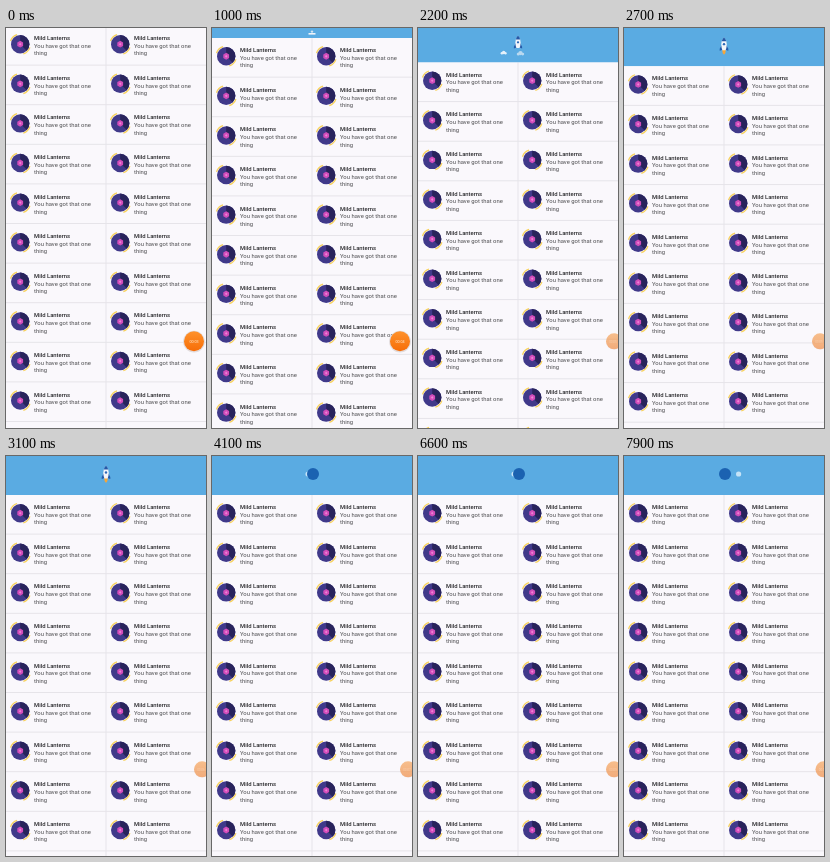
Animation, 200 px wide and 400 px high, one loop 8000 ms. Source, as an HTML page with a canvas:

```html
<!DOCTYPE html>
<html lang="en">
<head>
<meta charset="utf-8">
<title>Pull to refresh</title>
<style>
html, body { margin: 0; width: 100%; height: 100%; overflow: hidden; background: #faf8fc; }
canvas { display: block; width: 200px; height: 400px; }
</style>
</head>
<body>
<canvas></canvas>
<script>
const LOOP = 8000, ROW = 39.6, REFRESH_START = 3950;
const canvas = document.querySelector('canvas');
const ctx = canvas.getContext('2d');
const ratio = window.devicePixelRatio || 1;
canvas.width = 200 * ratio;
canvas.height = 400 * ratio;
ctx.scale(ratio, ratio);

// [time, value] stops
const pullStops = [[0, -2], [500, 3], [1000, 10], [1400, 21.5], [1800, 29], [2200, 34.5], [2800, 39]];
const bubbleStops = [[1850, 188], [2150, 196], [6900, 196], [7200, 199.5]];
const dimStops = [[1850, 0], [2150, 1]];

function along(stops, t) {
  if (t <= stops[0][0]) return stops[0][1];
  for (let i = 1; i < stops.length; i++) {
    const [t0, a] = stops[i - 1], [t1, b] = stops[i];
    if (t < t1) return a + (b - a) * (t - t0) / (t1 - t0);
  }
  return stops[stops.length - 1][1];
}

function circle(x, y, r, color) {
  ctx.fillStyle = color;
  ctx.beginPath();
  ctx.arc(x, y, r, 0, 2 * Math.PI);
  ctx.fill();
}

function shape(path, color) {
  ctx.fillStyle = color;
  ctx.fill(new Path2D(path));
}

function text(str, x, y, font, color) {
  ctx.font = font;
  ctx.fillStyle = color;
  ctx.fillText(str, x, y);
}

function badge(x, y) {
  ctx.save();
  ctx.translate(x, y);
  ctx.strokeStyle = '#f8d25c';
  ctx.lineWidth = 1.3;
  for (const a of [.1, 1.1]) {
    ctx.beginPath();
    ctx.arc(0, 0, 10.2, a * Math.PI, (a + .3) * Math.PI);
    ctx.stroke();
  }
  circle(0, 0, 9.2, '#40398a');
  ctx.fillStyle = '#28235b';
  ctx.beginPath();
  ctx.arc(0, 0, 9.2, -Math.PI / 2, Math.PI / 4);
  ctx.lineTo(0, 0);
  ctx.fill();
  shape('M0-3.4L2.9-1.7V1.7L0 3.4L-2.9 1.7V-1.7Z', '#d24cba');
  shape('M0-1.4L1.2 0L0 1.4L-1.2 0Z', '#ee86d6');
  ctx.restore();
}

function list(top) {
  ctx.textAlign = 'left';
  for (let row = 0; row < 11; row++) {
    const y = top + row * ROW;
    ctx.fillStyle = '#e6e4e9';
    ctx.fillRect(0, y + ROW - 1, 200, 1);
    for (const x of [0, 100]) {
      badge(x + 14.2, y + 18.2);
      text('Mild Lanterns', x + 28, y + 14.2, '500 5.9px Roboto, sans-serif', '#29292c');
      text('You have got that one', x + 28, y + 21.9, '5.9px Roboto, sans-serif', '#4c4c4f');
      text('thing', x + 28, y + 29.4, '5.9px Roboto, sans-serif', '#4c4c4f');
    }
  }
  ctx.fillStyle = '#e6e4e9';
  ctx.fillRect(99.5, Math.max(0, top), 1, 400);
}

function cloud(x, y, s, color = '#e6f1fa') {
  circle(x - 2 * s, y + .4 * s, 1.4 * s, color);
  circle(x, y - .4 * s, 1.9 * s, color);
  circle(x + 2 * s, y + .5 * s, 1.3 * s, color);
}

function rocket(x, y, scale, burning) {
  ctx.save();
  ctx.translate(x, y);
  ctx.scale(scale, scale);
  if (burning) shape('M-1.7 4Q-2 7 0 9Q2 7 1.7 4Z', '#f7a637');
  shape('M-2-1L-4.3 3V5L-1.5 4ZM2-1L4.3 3V5L1.5 4Z', '#2459a8');
  shape('M0-8.5Q3-5 2.8-1Q2.6 2 1.6 4.5H-1.6Q-2.6 2-2.8-1Q-3-5 0-8.5Z', '#f3f5fa');
  shape('M0-8.5Q1.7-6.7 2.3-4.5H-2.3Q-1.7-6.7 0-8.5Z', '#2459a8');
  circle(0, -1.5, 1.2, '#2d68b8');
  ctx.restore();
}

function launch(h) {
  if (h < 16) {
    ctx.fillStyle = '#eef4fa';
    ctx.fillRect(96.5, 5, 7, 1.6);
    circle(100, 3.6, 1.2, '#d3e4f2');
  } else if (h < 27) {
    cloud(92.5, 4.8, 1.1);
    cloud(106.5, 4.8, 1.1);
    circle(100, 9, 2, '#d3e4f2');
    circle(100, 8.6, .8, '#2d68b8');
  } else {
    const drift = (h - 34.5) * 2, burning = h >= 38;
    if (!burning) {
      cloud(85.7 - drift, 24.8 + drift / 2, .9);
      cloud(102.5 + drift, 25.5 + drift / 2, 1.1, '#b9d9f0');
    }
    rocket(100, h / 2 - 1.5, Math.min(1, h / 36), burning);
  }
}

// The moon crosses quickly in front and returns slowly behind.
function planet(t) {
  const phase = (t - 4900 + 2500) % 2500;
  const front = phase < 750;
  const swing = front ? -Math.cos(Math.PI * phase / 750) : Math.cos(Math.PI * (phase - 750) / 1750);
  const moon = () => circle(100 + 29 * swing, 18, 2.6, '#c5e3f7');
  if (!front) moon();
  circle(101, 18, 6, '#1b62b1');
  if (front) moon();
}

// The recording bubble shrinks and fades when docked at the edge.
function bubble(t) {
  const x = along(bubbleStops, t), y = 313.3;
  const dim = along(dimStops, t), r = 10 - 2 * dim;
  ctx.save();
  ctx.globalAlpha = 1 - dim / 2;
  circle(x, y + .3, r + .9 * (1 - dim), '#e2dcdd');
  const glow = ctx.createLinearGradient(x, y - r, x, y + r);
  glow.addColorStop(0, '#ff922b');
  glow.addColorStop(1, '#f66d08');
  circle(x, y, r, glow);
  ctx.textAlign = 'center';
  const seconds = String(3 + Math.floor(t / 1000)).padStart(2, '0');
  text('00:' + seconds, x - dim, y + 1.3, (3.7 - .7 * dim) + 'px Roboto, sans-serif', '#fff0df');
  ctx.restore();
}

function draw(t) {
  const h = along(pullStops, t);
  ctx.fillStyle = '#faf8fc';
  ctx.fillRect(0, 0, 200, 400);
  list(h);
  if (h > 0) {
    ctx.save();
    ctx.beginPath();
    ctx.rect(0, 0, 200, h);
    ctx.clip();
    ctx.fillStyle = '#5aabe2';
    ctx.fillRect(0, 0, 200, h);
    if (t < REFRESH_START) launch(h);
    else planet(t);
    ctx.restore();
  }
  bubble(t);
}

function tick() {
  draw(performance.now() % LOOP);
  requestAnimationFrame(tick);
}
tick();
</script>
</body>
</html>
```
